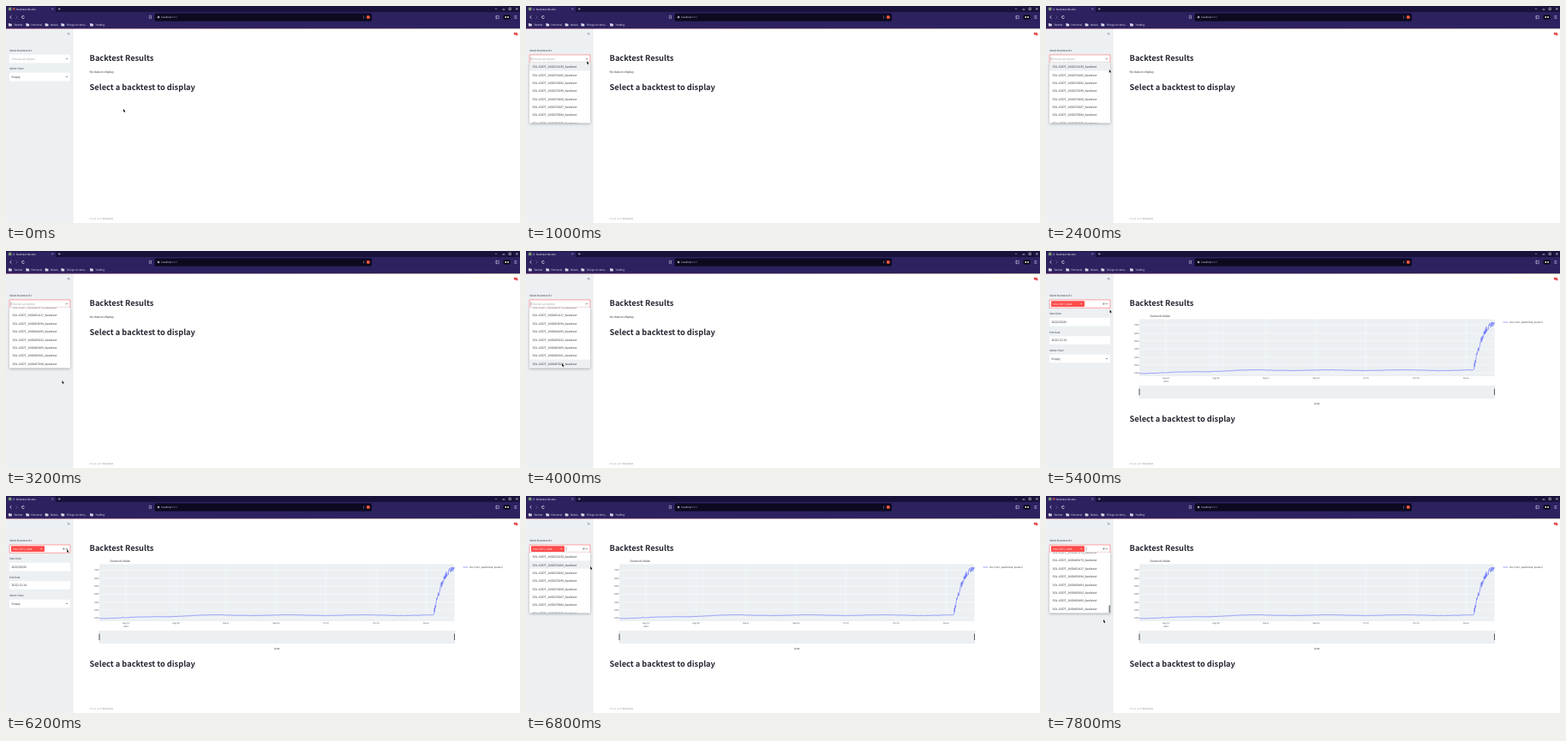
An HTML page with a canvas for the animation above (8 s loop, 600 by 253 pixels).

```html
<!DOCTYPE html>
<html lang="en">
<head>
<meta charset="utf-8">
<title>Backtest Results</title>
<style>
html, body { margin: 0; width: 100%; height: 100%; overflow: hidden; background: #fff; }
canvas { display: block; width: 600px; height: 253px; }
</style>
</head>
<body>
<canvas id="stage"></canvas>
<script>
const LOOP = 8000, STEP = 200;
const PAGE = '"Noto Sans CJK SC", "Noto Sans CJK JP", "Noto Sans CJK", "Open Sans", sans-serif';
const CHROME = '"Noto Sans", sans-serif';
const INK = '#31333f', RED = '#ff4b4b', GREY = '#ecf0f3', BLUE = '#636efa', PALE = '#d8d2ea';
const BODY = 3.36, SMALL = 2.94, TICK = 2.52;
const ROW = 9.375, ROWS = 58;
const LIST = { x: 4, y: 66, w: 71, h: 70.6 };
const PLOT = { left: 109, right: 523.5, top: 79.5, bottom: 146.1 };

const canvas = document.getElementById('stage');
const ctx = canvas.getContext('2d');
const ratio = window.devicePixelRatio || 1;
canvas.width = 600 * ratio;
canvas.height = 253 * ratio;

const progress = (t, from, to) => Math.min(1, Math.max(0, (t - from) / (to - from)));
const smooth = k => k * k * (3 - 2 * k);

function seeded(seed) {
  return () => (seed = (seed * 16807) % 2147483647) / 2147483647;
}

// Runs cluster at both ends of the recorded period
const names = Array.from({ length: ROWS }, (_, i) => {
  const id = 1668274233 + Math.round(182835 * smooth(i / (ROWS - 1)));
  return `SOL-USDT_${id}_backtest`;
});

// Pointer stops: time, x, y
const stops = [[0, 137, 120], [800, 71, 63], [2000, 73, 80], [2600, 74, 72], [3000, 71, 138],
  [3400, 60, 164], [4000, 42, 131], [4600, 78, 75], [6200, 71, 62], [6800, 75, 82],
  [7000, 74, 73], [7800, 67, 144]];

function pointerAt(t) {
  const i = Math.max(1, stops.findIndex(stop => stop[0] >= t));
  const [[t0, x0, y0], [t1, x1, y1]] = [stops[i - 1], stops[i]];
  const k = smooth(progress(t, t0, t1));
  return { x: x0 + (x1 - x0) * k, y: y0 + (y1 - y0) * k };
}

function text(str, x, y, size, color = INK, { font = PAGE, weight = 400, align = 'left' } = {}) {
  ctx.font = `${weight} ${size}px ${font}`;
  ctx.textRendering = 'geometricPrecision';
  ctx.textAlign = align;
  ctx.fillStyle = color;
  ctx.fillText(str, x, y);
  return ctx.measureText(str).width;
}

function box(x, y, w, h, fill, radius = 0) {
  ctx.beginPath();
  ctx.roundRect(x, y, w, h, radius);
  ctx.fillStyle = fill;
  ctx.fill();
}

function disc(x, y, r, fill) {
  box(x - r, y - r, 2 * r, 2 * r, fill, r);
}

// Strokes an SVG path placed at x, y
function icon(path, x, y, color = INK, width = 0.5) {
  ctx.save();
  ctx.translate(x, y);
  ctx.strokeStyle = color;
  ctx.lineWidth = width;
  ctx.stroke(new Path2D(path));
  ctx.restore();
}

const rule = (x, y, w, color, width = 0.4) => icon(`M0 0h${w}`, x, y, color, width);
const pole = (x, y, h, color, width = 0.4) => icon(`M0 0v${h}`, x, y, color, width);
const cross = (x, y, r, color, width) =>
  icon(`M${-r} ${-r}L${r} ${r}M${-r} ${r}L${r} ${-r}`, x, y, color, width);
const chevron = (x, y, color) => icon('M-1-.5L0 .5 1-.5', x, y, color, 0.6);

function drawBrowser(redDot) {
  const plain = { font: CHROME }, bar = '#2d2160';
  box(0, 0, 600, 8, '#19123a');
  box(0, 0.4, 58, 8, bar, 1);
  box(0, 7, 600, 19.4, bar);
  box(3, 1.8, 3.4, 3.4, '#7d9b78', 0.5);
  if (redDot) disc(9.4, 3.4, 1.2, '#d65a4a');
  else text('8·', 8.2, 4.6, 3, PALE, plain);
  text('Backtest Results', 12, 4.6, 3, '#f2effa', plain);
  cross(54.3, 3.4, 0.9, PALE);
  icon('M-1.5 0h3M0-1.5v3', 62.2, 3.4, PALE);

  chevron(572, 3.4, PALE);
  rule(579.5, 4, 2.8, '#fff', 0.7);
  icon('M0 0h2.3v2.3h-2.3z', 587, 2.2, '#fff');
  cross(596.3, 3.4, 1.2, '#fff', 0.6);

  icon('M1-1.7L-.8 0 1 1.7', 5.4, 13, '#fff', 0.7);
  icon('M-1-1.7L.8 0-1 1.7', 12.6, 13, '#6f60a0', 0.7);
  icon('M1.4 .6A1.5 1.5 0 1 1 1.2-.9', 20, 13, '#fff', 0.7);
  icon('M-1.1-1.7h2.2v3.4L0 .8-1.1 1.7z', 168.4, 13, PALE);

  box(173.5, 8.4, 253.5, 9.3, '#0d0a20', 1.5);
  disc(178, 13, 1.3, '#aaa3bd');
  const width = text('localhost', 181.3, 14.1, 2.8, '#eeeaf6', plain);
  text(':8501', 181.3 + width, 14.1, 2.8, '#7c7494', plain);
  pole(417.5, 11.5, 2.8, PALE);
  disc(422.8, 13, 2.1, '#f0583c');

  icon('M0 0h3.4v3.4h-3.4zM.8 0v3.4', 571.9, 11.3, PALE);
  box(580.6, 10.5, 8, 5, '#08060f', 1.5);
  disc(583.3, 13, 0.9, '#fff');
  disc(586, 13, 0.9, '#fff');
  icon('M0-1.4h3M0 0h3M0 1.4h3', 593.3, 13, PALE);

  let x = 3;
  for (const label of ['Tavmer', 'Personal', 'Nelvia', 'Things to reme...', 'Trading']) {
    box(x, 20.2, 1.8, 1, '#d9d4e4', 0.3);
    box(x, 20.7, 3.8, 2.8, '#d9d4e4', 0.4);
    x += 10 + text(label, x + 6.2, 23.1, 3, '#f2effa', plain);
  }
}

function drawField(label, value, y, isSelect) {
  text(label, 4, y - 3.5, SMALL);
  box(4, y, 71, 9.6, '#fff', 0.9);
  text(value, 6.4, y + 5.9, BODY);
  if (isSelect) chevron(70.8, y + 4.8);
}

function drawSidebar({ selected, focused, open, chart }) {
  box(0, 26.6, 78.75, 226.4, GREY);
  cross(73, 32.4, 1);
  text("Select Backtest id's", 4, 53.3, SMALL);
  box(4, 56.8, 71, 9.6, '#fff', 0.9);
  if (selected) {
    box(6, 58.2, 39, 6.8, RED, 0.9);
    text('SOL-USDT_1668...', 8, 62.6, SMALL, '#fff');
    cross(41.2, 61.6, 0.7, '#fff');
    disc(67.4, 61.6, 1.1, '#6d6f78');
    cross(67.4, 61.6, 0.45, '#fff', 0.3);
  } else {
    text('Choose an option', 6.4, 62.7, BODY, '#9a9ba2');
  }
  chevron(70.8, 61.6);
  if (focused) icon('M0 0h70.8v9.4h-70.8z', 4.1, 56.9, RED);
  if (open) pole(selected ? 47 : 5.8, 59.6, 4, INK);

  const fields = selected ? [['Start Date', '2022/08/06'], ['End Date', '2022/11/14']] : [];
  if (!selected || chart) fields.push(['Select Chart', 'Empty', true]);
  fields.forEach(([label, value, isSelect], i) => drawField(label, value, 77.8 + i * 21.45, isSelect));
}

function drawList({ selected, scroll, pointer, dragging }) {
  const rows = selected ? names.slice(0, -1) : names;
  const offset = scroll * (rows.length * ROW - LIST.h + 0.8);
  const inside = pointer.y < LIST.y + LIST.h;
  const underPointer = Math.floor((pointer.y - LIST.y + offset) / ROW);
  const hovered = inside && !dragging ? Math.max(0, underPointer) : -1;

  ctx.save();
  ctx.shadowColor = 'rgba(0,0,0,.3)';
  ctx.shadowBlur = 3 * ratio;
  ctx.shadowOffsetY = 0.8 * ratio;
  box(LIST.x, LIST.y, LIST.w, LIST.h, '#fff', 0.9);
  ctx.restore();

  ctx.save();
  ctx.beginPath();
  ctx.rect(LIST.x, LIST.y, LIST.w, LIST.h);
  ctx.clip();
  rows.forEach((name, i) => {
    const top = LIST.y + i * ROW - offset;
    if (i === hovered) box(LIST.x, top, LIST.w, ROW, GREY);
    text(name, 7.5, top + 6.2, BODY);
  });
  if (dragging) box(73.4, LIST.y + scroll * (LIST.h - 9.4), 1.5, 9.2, '#777a80', 0.6);
  ctx.restore();
}

// A slow calm rise, then a steep jagged climb that levels off
function drawAccountLine() {
  const random = seeded(42), climbStart = 499;
  ctx.beginPath();
  for (let x = PLOT.left; x < PLOT.right; x += x < climbStart ? 0.9 : 0.45) {
    const calm = 142.4 - 3.4 * smooth(progress(x, PLOT.left, 250)) + 0.4 * Math.sin(x / 14);
    const climb = 54 * (1 - (1 - progress(x, climbStart, PLOT.right)) ** 2.2);
    const noise = x < climbStart ? 0.6 : 7;
    ctx.lineTo(x, calm - climb + (random() - 0.5) * noise);
  }
  ctx.strokeStyle = BLUE;
  ctx.lineWidth = 0.65;
  ctx.lineJoin = 'round';
  ctx.stroke();
}

function drawChart() {
  const { left, right, top, bottom } = PLOT;
  const width = right - left, label = '#444b5a', centered = { align: 'center' };
  text('Account Value', 121.5, 76.5, 3.56);
  box(left, top, width, bottom - top, GREY);
  for (let i = 0; i < 7; i++) {
    const y = 142.2 - i * 9.3, x = 140 + i * 58.4;
    const day = new Date(2022, 7, 14 + 14 * i);
    rule(left, y, width, '#fff');
    pole(x, top, bottom - top, '#fff');
    text((i + 1) * 1000, left - 0.4, y + 0.9, TICK, label, { align: 'right' });
    text(day.toLocaleDateString('en-US', { month: 'short', day: 'numeric' }), x, 149.4, TICK, label, centered);
  }
  text('2022', 140, 152.9, TICK, label, centered);
  drawAccountLine();

  box(left, 157, width, 14.4, GREY);
  rule(left, 171.5, width, '#cfd3d8', 0.3);
  for (const x of [left, right]) {
    pole(x, 157, 14.4, '#b6bac2', 0.3);
    box(x - 0.5, 160.4, 1, 7.6, '#555a64', 0.3);
  }
  text('Date', (left + right) / 2, 179.2, SMALL, INK, centered);
  rule(533.5, 83, 6, BLUE, 0.6);
  text(names[ROWS - 1], 541, 84, TICK);
}

function drawMain({ running, chart }) {
  const heading = (str, y) => text(str, 97.6, y, 9.26, '#262833', { weight: 700 });
  heading('Backtest Results', 63.6);
  if (chart) drawChart();
  else text('No data to display.', 97.6, 77.8, BODY);
  heading('Select a backtest to display', chart ? 199 : 97.9);
  const width = text('Made with ', 97.6, 249.4, SMALL, '#b3b4ba');
  text('Streamlit', 97.6 + width, 249.4, SMALL, '#85868e');

  if (running) {
    disc(554.4, 30.4, 0.6, '#777982');
    icon('M-1.4 1.6L-.2.4V-1.2L1.6-.2M-.2.4L1 2', 554.4, 32.4, '#777982');
    text('Running...', 559.3, 33.5, SMALL, '#a9aab1');
    text('Stop', 580, 33.5, SMALL);
  }
  box(592.8, 30.9, 4, 2.7, '#e5484d', 0.6);
  box(595, 32.4, 2.6, 1.8, '#e5484d', 0.4);
}

function drawPointer({ x, y }) {
  const arrow = new Path2D('M0 0V3.6L.8 2.9 1.4 4.2 2 3.9 1.4 2.7H2.4z');
  ctx.save();
  ctx.translate(x, y);
  ctx.strokeStyle = '#fff';
  ctx.lineWidth = 0.5;
  ctx.stroke(arrow);
  ctx.fillStyle = '#111';
  ctx.fill(arrow);
  ctx.restore();
}

function draw(t) {
  const selected = t >= 4200;
  const state = {
    selected,
    open: (t >= 800 && !selected) || t >= 6400,
    focused: t >= 800,
    running: selected && t < 4800,
    chart: t >= 4800,
    scroll: selected ? progress(t, 7000, 7600) : progress(t, 2600, 3000),
    dragging: (t > 2600 && t < 3200) || t > 7000,
    pointer: pointerAt(t)
  };
  ctx.setTransform(ratio, 0, 0, ratio, 0, 0);
  box(0, 0, 600, 253, '#fff');
  drawMain(state);
  drawSidebar(state);
  drawBrowser(t < 400 || t >= 7400);
  const band = ctx.createLinearGradient(0, 0, 600, 0);
  band.addColorStop(0, RED);
  band.addColorStop(1, '#fffd80');
  box(0, 26.4, 600, 0.47, band);
  if (state.open) drawList(state);
  drawPointer(state.pointer);
}

const start = performance.now();
function tick() {
  const t = (performance.now() - start) % LOOP;
  draw(Math.floor(t / STEP) * STEP);
  requestAnimationFrame(tick);
}
tick();
</script>
</body>
</html>
```
